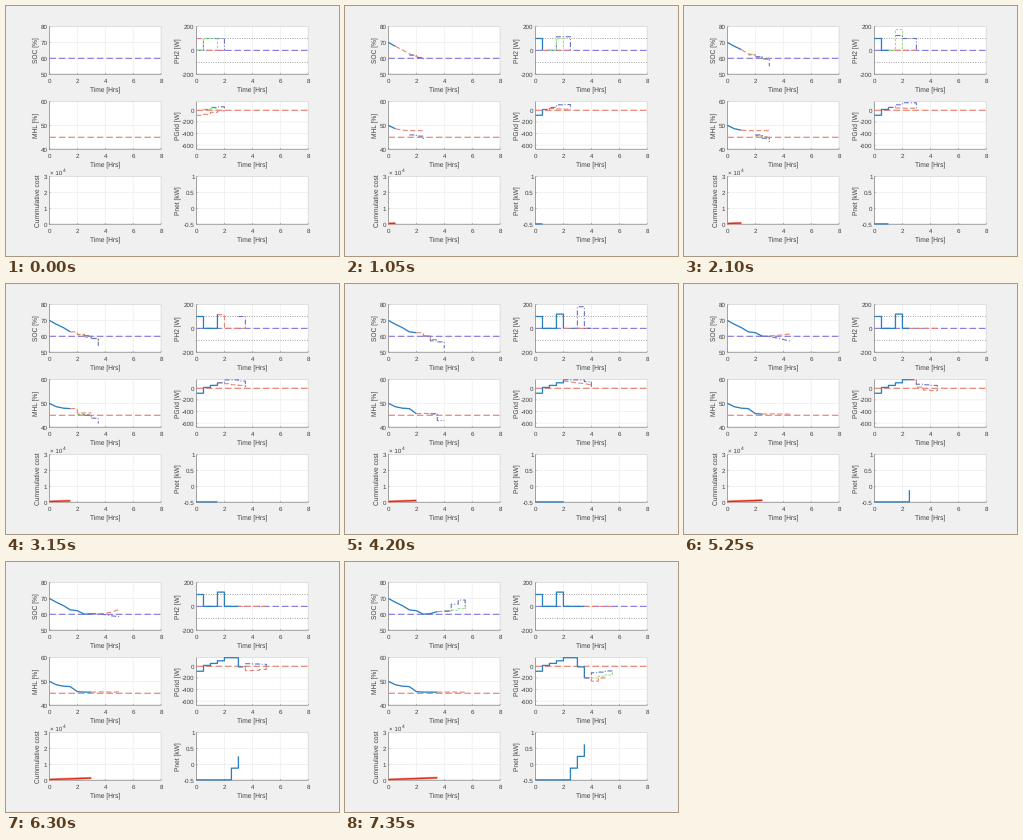
Animation, 333 px wide and 250 px high, one loop 8 s. Source, as a matplotlib script:

```python
import matplotlib.pyplot as plt
import numpy as np
from matplotlib.animation import FuncAnimation

W, H, DPI = 333, 250, 100
PX = 72 / DPI
INTERVAL, LOOP, HOLD = 50, 8000, 1050
STEP = 0.5  # hours simulated per update

BLUE, RED, GREEN = "#2a7fc0", "#ea8273", "#98e488"
VIOLET, SALMON, NAVY = "#8880de", "#ea8475", "#6670c4"
OLIVE, INK, GRID = "#9a9a58", "#404040", "#ececec"
SPINE, EDGE = "#707070", "#d6d6d6"

plt.rcParams["font.family"] = "Liberation Sans"
plt.rcParams["text.hinting"] = "none"
plt.rcParams["lines.scale_dashes"] = False

fig = plt.figure(figsize=(W / DPI, H / DPI), dpi=DPI, facecolor="#f0f0f0")
ax = fig.add_axes([0, 0, 1, 1])
ax.set(xlim=(0, W), ylim=(H, 0))
ax.axis("off")


def text(x, y, s, size=6.3, **kw):
    kw = {"ha": "center", "va": "center_baseline", "color": INK, **kw}
    ax.text(x, y, s, fontsize=size * PX, **kw)


def stroke(x, y, color, width=1.0, dash=None, z=3):
    style = (0, [d * PX for d in dash]) if dash else "-"
    return ax.plot(x, y, color=color, lw=width * PX, ls=style, zorder=z,
                   solid_capstyle="butt", dash_capstyle="butt", snap=False)[0]


class Panel:
    """One chart: 8 hours wide, mapped to stage pixels."""

    def __init__(self, left, top, low, high, ticks, label, label_x):
        self.left, self.top, self.low, self.high = left, top, low, high
        right, bottom = left + 111.7, top + 47.6
        self.bottom = bottom
        ax.fill([left, right, right, left], [top, top, bottom, bottom],
                color="white", lw=0, zorder=0)
        for hour in range(0, 9, 2):
            x = self.x(hour)
            stroke([x, x], [top, bottom], GRID, 0.7, z=1)
            stroke([x, x], [bottom, bottom - 1.1], SPINE, 0.5, z=2)
            text(x, bottom + 6.6, str(hour))
        for v in ticks:
            y = self.y(v)
            stroke([left, right], [y, y], GRID, 0.7, z=1)
            stroke([left, left + 1.1], [y, y], SPINE, 0.5, z=2)
            text(left - 2, y + 0.2, f"{v:g}", ha="right")
        stroke([left, right], [top, top], EDGE, 0.6, z=1)
        stroke([right, right], [top, bottom], EDGE, 0.6, z=1)
        stroke([left, left, right], [top, bottom, bottom], SPINE, 0.6, z=2)
        text((left + right) / 2, bottom + 15, "Time [Hrs]", 6.6)
        text(label_x, (top + bottom) / 2, label, 6.6, rotation=90, va="center")

    def x(self, t):
        return self.left + np.asarray(t) * 111.7 / 8

    def y(self, v):
        span = self.high - self.low
        return self.bottom - (np.asarray(v) - self.low) * 47.6 / span

    def line(self, t, v, color, width=1.0, dash=None, z=3):
        return stroke(self.x(t), self.y(v), color, width, dash, z)

    def level(self, v, color, width=1.2, dash=(6.5, 3)):
        self.line([0, 8], [v, v], color, width, dash)


soc = Panel(43.4, 20.6, 50, 80, (50, 60, 70, 80), "SOC [%]", 29.7)
ph2 = Panel(190.5, 20.6, -200, 200, (-200, 0, 200), "PH2 [W]", 171.5)
mhl = Panel(43.4, 95.6, 40, 60, (40, 50, 60), "MHL [%]", 29.7)
grid = Panel(190.5, 95.6, -670, 150, (-600, -400, -200, 0), "PGrid [W]", 171.5)
cost = Panel(43.4, 170.6, 0, 3, (0, 1, 2, 3), "Cummulative cost", 32.5)
net = Panel(190.5, 170.6, -0.5, 1, (-0.5, 0, 0.5, 1), "Pnet [kW]", 172)
text(43.6, 167, "× 10", ha="left")
text(57, 164.5, "4", 4.9, ha="left")

soc.level(60, VIOLET)
mhl.level(45, SALMON)
grid.level(0, SALMON)
ph2.level(0, VIOLET)
for bound in (-100, 100):
    ph2.level(bound, "#606060", 0.7, (0.8, 1.6))

COUNT = 8
shots = [[] for _ in range(COUNT)]


def stairs(v, t0=0):
    n = np.repeat(np.arange(len(v)), 2)[1:]
    return t0 + STEP * n, np.repeat(v, 2)[:-1]


def history():
    soc_path = [70, 67.6, 65.5, 62.8, 62.3, 60.1, 60.4, 61.7]
    mhl_path = [50, 48.6, 48, 47.8, 45.7, 45.5, 45.5, 45.5]
    ph2_path = [100, 0, 0, 120, 0, 0, 0, 0]
    grid_path = [-85, 15, 50, 95, 148, 148, -10, -200]
    net_path = [-0.49] * 5 + [-0.12, 0.25, 0.63]
    for k in range(1, COUNT):
        t = STEP * np.arange(k + 1)
        for p, path in ((soc, soc_path), (mhl, mhl_path)):
            shots[k].append(p.line(t, path[:k + 1], BLUE, 1.3, z=5))
        for p, path in ((ph2, ph2_path), (grid, grid_path), (net, net_path)):
            shots[k].append(p.line(*stairs(path[:k + 1]), BLUE, 1.3, z=5))
        spent = 0.04 + 0.032 * t
        shots[k].append(cost.line(t, spent, "#f3a59c", 2.4, z=4))
        shots[k].append(cost.line(t, spent, "#dc2a1c", 1.3, z=5))


DASHES = {RED: (5, 2.5), NAVY: (5, 2, 1, 2), GREEN: (2.5, 1.5), OLIVE: (3, 2)}


def plan(k, panel, color, t0, *v, slope=False):
    """Predicted course at update k: steps of half an hour, or a slope."""
    t, v = (t0 + STEP * np.arange(len(v)), v) if slope else stairs(v, t0)
    shots[k].append(panel.line(t, v, color, 1.1, DASHES[color], z=4))


history()

plan(0, ph2, RED, 0, 100, 0, 0, 0, 0)
plan(0, ph2, NAVY, 0, 0, 100, 100, 100, 0)
plan(0, ph2, GREEN, 0, 0, 100, 100, 0)
plan(0, grid, RED, 0, -85, -70, -35, -10, 0)
plan(0, grid, NAVY, 0.5, 15, 50, 60, 0)
plan(0, grid, GREEN, 0.5, 10, 35, 0)

plan(1, soc, RED, 0.5, 67.6, 65.3, 62.8, 61, 60, slope=True)
plan(1, soc, NAVY, 1.5, 62, 60.5, 59)
plan(1, mhl, RED, 0.5, 48.6, 48, 47.8, 47.8, 47.8, slope=True)
plan(1, mhl, NAVY, 1.5, 46, 45.5, 44)
plan(1, ph2, RED, 0.5, 0, 0, 0, 0, 0)
plan(1, ph2, NAVY, 1, 0, 115, 115, 0)
plan(1, ph2, GREEN, 1, 0, 100, 0)
plan(1, grid, RED, 0.5, 15, 30, 25, 20, 0)
plan(1, grid, NAVY, 0.5, 15, 50, 95, 100, 20)

plan(2, soc, RED, 1, 65.5, 62.8, 62.2, slope=True)
plan(2, soc, OLIVE, 1.5, 62.2, 60.8, 59.8, 59)
plan(2, soc, NAVY, 2, 61, 59.6, 55)
plan(2, mhl, RED, 1, 48, 47.8, 47.8, 47.8, 47.8, slope=True)
plan(2, mhl, OLIVE, 2, 45.6, 45.2, 44)
plan(2, mhl, NAVY, 2, 46, 44.6, 43)
plan(2, ph2, RED, 1, 0, 0, 0, 0, 0)
plan(2, ph2, GREEN, 1, 0, 175, 0)
plan(2, ph2, NAVY, 1.5, 125, 100, 100, 0)
plan(2, grid, RED, 1, 50, 40, 35, 35, 20)
plan(2, grid, NAVY, 1, 50, 95, 130, 130, 30)

plan(3, soc, RED, 1.5, 62.8, 61.2, 59.6)
plan(3, soc, OLIVE, 2, 61, 59.5, 58.7, 57)
plan(3, soc, NAVY, 2.5, 60.4, 58.6, 54)
plan(3, mhl, RED, 1.5, 47.8, 46, 46, 46)
plan(3, mhl, OLIVE, 2, 45.4, 45.2, 44.4)
plan(3, mhl, NAVY, 2.5, 45, 43.8, 41.5)
plan(3, ph2, RED, 1.5, 115, 0, 0, 0, 0)
plan(3, ph2, NAVY, 3, 100, 0)
plan(3, grid, RED, 1.5, 95, 80, 60, 50, 20)
plan(3, grid, NAVY, 1.5, 95, 145, 145, 125, 30)

plan(4, soc, RED, 2, 62.3, 60.2, 58, 57.6)
plan(4, soc, NAVY, 2.5, 60.2, 57.2, 56.5, 52.5)
plan(4, mhl, RED, 2, 45.7, 45.8, 45.7, 45.7, slope=True)
plan(4, mhl, NAVY, 3, 45.6, 42.8, 42.8)
plan(4, ph2, RED, 2, 0, 0, 0, 0, 0)
plan(4, ph2, NAVY, 2.5, 0, 182, 0, 0)
plan(4, grid, RED, 2, 130, 110, 95, 80, 60, slope=True)
plan(4, grid, NAVY, 2, 148, 145, 145, 115, 20)

plan(5, soc, RED, 2.5, 60.1, 60.3, 60.5, 61, 61.5, slope=True)
plan(5, soc, NAVY, 2.5, 60.1, 59.8, 59, 58, 57, slope=True)
plan(5, mhl, RED, 2.5, 45.5, 45.6, 45.6, 45.5, 45.5, slope=True)
plan(5, ph2, RED, 2.5, 0, 0, 0, 0, 0)
plan(5, grid, RED, 2.5, 148, 20, -30, -40, 0)
plan(5, grid, NAVY, 2.5, 148, 70, 60, 50, 0)

plan(6, soc, RED, 3, 60.4, 60.4, 60.6, 61.6, 63, slope=True)
plan(6, soc, NAVY, 3, 60.4, 60.2, 59.8, 59, 58.5, slope=True)
plan(6, mhl, RED, 3, 45.5, 45.6, 45.6, 45.5, 45.6, slope=True)
plan(6, ph2, RED, 3, 0, 0, 0, 0, 0)
plan(6, grid, RED, 3, -10, -75, -70, -55, 0)
plan(6, grid, NAVY, 3, -10, 45, 40, 35, 0)

plan(7, soc, RED, 3.5, 61.7, 61.9, 62.6, slope=True)
plan(7, soc, GREEN, 4, 62, 62.6, 63.6, 69)
plan(7, soc, NAVY, 4, 62, 66.4, 69, 63.6)
plan(7, mhl, RED, 3.5, 45.5, 45.5, 45.6, 45.5, 45.5, slope=True)
plan(7, ph2, RED, 3.5, 0, 0, 0, 0, 0)
plan(7, grid, RED, 3.5, -200, -255, -200, -160)
plan(7, grid, NAVY, 3.5, -200, -110, -100, -80, -155)
plan(7, grid, GREEN, 4, -200, -170, -150, -85)


def update(i):
    now = i * INTERVAL // HOLD
    for k, lines in enumerate(shots):
        for ln in lines:
            ln.set_visible(k == now)
    return [ln for lines in shots for ln in lines]


anim = FuncAnimation(fig, update, frames=LOOP // INTERVAL, interval=INTERVAL,
                     init_func=lambda: update(0), repeat=True, repeat_delay=0)
plt.show()
```
